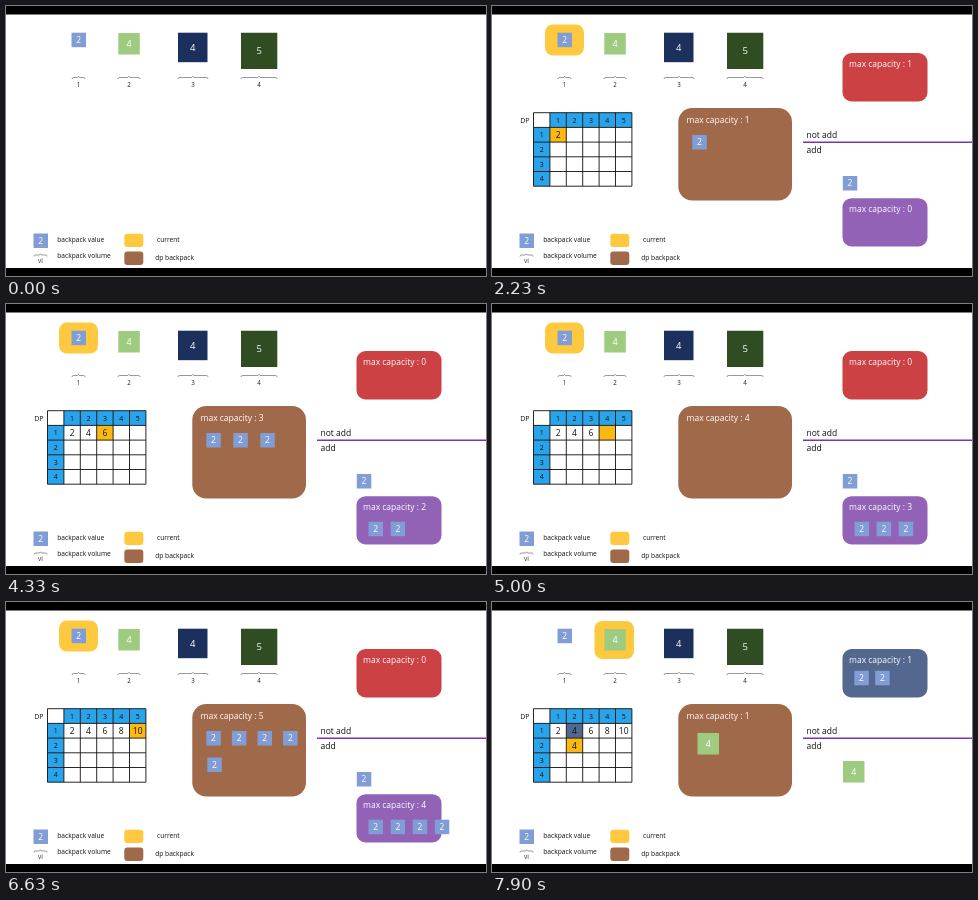
Animation of 480 by 270 pixels, one loop 8000 ms. Source, as an HTML page with a canvas:

```html
<!DOCTYPE html>
<html>
<head>
<meta charset="utf-8">
<style>
html, body { margin: 0; width: 100%; height: 100%; overflow: hidden; background: #fff; }
canvas { display: block; width: 480px; height: 270px; }
</style>
</head>
<body>
<canvas></canvas>
<script>
const LOOP = 8000;
const BLUE = '#819dd5', GREEN = '#9fcb80', NAVY = '#1c305d', FOREST = '#2f4c22';
const YELLOW = '#fec93e', BROWN = '#a0694a', RED = '#cc4143', PURPLE = '#9162b6';
const SLATE = '#53678f', HEADER = '#29a4ea', CURRENT = '#fdb913';

const canvas = document.querySelector('canvas');
const ctx = canvas.getContext('2d');
const ratio = window.devicePixelRatio || 1;
canvas.width = 480 * ratio;
canvas.height = 270 * ratio;
ctx.scale(ratio, ratio);

function text(label, x, y, size, color = '#111', align = 'left') {
  ctx.font = `${size}px "Open Sans", "Noto Sans", sans-serif`;
  ctx.fillStyle = color;
  ctx.textAlign = align;
  ctx.fillText(label, x, y);
}

function box(x, y, w, h, color, radius = 0) {
  ctx.fillStyle = color;
  ctx.beginPath();
  ctx.roundRect(x, y, w, h, radius);
  ctx.fill();
}

function item(value, x, y, size, color, fontSize = 8.5) {
  box(x, y, size, size, color);
  text(value, x + size / 2, y + size / 2 + fontSize * 0.36, fontSize, '#fff', 'center');
}

const two = (x, y) => item(2, x, y, 14.5, BLUE);
const four = (x, y) => item(4, x, y, 21.5, GREEN, 9);

function brace(x, w, y) {
  const mid = x + w / 2;
  ctx.strokeStyle = '#555';
  ctx.lineWidth = 0.6;
  ctx.beginPath();
  ctx.moveTo(x, y + 1.5);
  ctx.quadraticCurveTo(x, y, x + 1.5, y);
  ctx.lineTo(mid - 1, y);
  ctx.lineTo(mid, y - 1.2);
  ctx.lineTo(mid + 1, y);
  ctx.lineTo(x + w - 1.5, y);
  ctx.quadraticCurveTo(x + w, y, x + w, y + 1.5);
  ctx.stroke();
}

function capacity(value, x, y) {
  text(`max capacity : ${value}`, x, y, 8.5, '#fff');
}

function drawBase() {
  box(0, 0, 480, 270, '#fff');
  box(0, 0, 480, 8.5, '#000');
  box(0, 262, 480, 8, '#000');
  two(27.5, 227.5);
  brace(28, 13, 249);
  text('vi', 34.5, 257.3, 6.5, '#333', 'center');
  text('backpack value', 51.3, 235.8, 6.65);
  text('backpack volume', 51.3, 252.3, 6.65);
  box(118.3, 227.7, 19, 13.3, YELLOW, 3);
  box(118.3, 245.5, 19, 13.5, BROWN, 3);
  text('current', 151, 235.8, 6.65);
  text('dp backpack', 149.2, 254.2, 6.65);
}

function drawItems(row) {
  if (row === 1) box(53, 18.5, 39, 31, YELLOW, 8);
  if (row === 2) box(102.5, 19, 39.5, 38, YELLOW, 8);
  two(65.5, 26.7);
  four(112.3, 27);
  item(4, 172, 26.7, 29.5, NAVY, 9.5);
  item(5, 235, 26.7, 36.3, FOREST, 9.5);
  [[66, 13], [112, 22], [172, 30], [235, 36]].forEach(([x, w], i) => {
    brace(x, w, 71.5);
    text(i + 1, x + w / 2, 80.7, 6.2, '#222', 'center');
  });
}

function drawTable(row, col, filled, solved) {
  const left = 41.5, top = 106.7, cw = 16.4, ch = 14.7;
  const cell = (r, c, color) => box(left + c * cw, top + r * ch, cw, ch, color);
  const write = (label, r, c, size) =>
    text(label, left + (c + 0.5) * cw, top + (r + 0.5) * ch + size * 0.37, size, '#111', 'center');

  text('DP', 28.2, 117, 7);
  for (let c = 1; c <= 5; c++) cell(0, c, HEADER);
  for (let r = 1; r <= 4; r++) cell(r, 0, HEADER);
  if (row === 2) cell(1, 2, SLATE);
  if (row) cell(row, col, CURRENT);

  ctx.strokeStyle = '#111';
  ctx.lineWidth = 0.9;
  ctx.beginPath();
  for (let c = 0; c <= 6; c++) {
    ctx.moveTo(left + c * cw, top);
    ctx.lineTo(left + c * cw, top + 5 * ch);
  }
  for (let r = 0; r <= 5; r++) {
    ctx.moveTo(left, top + r * ch);
    ctx.lineTo(left + 6 * cw, top + r * ch);
  }
  ctx.stroke();

  for (let c = 1; c <= 5; c++) write(c, 0, c, 7);
  for (let r = 1; r <= 4; r++) write(r, r, 0, 7);
  for (let c = 1; c <= filled; c++) write(2 * c, 1, c, 8.5);
  if (row === 2 && solved) write(4, 2, 2, 8.5);
}

function drawBackpack(label, row, count) {
  box(186.3, 102, 113.7, 92.5, BROWN, 14);
  capacity(label, 194.5, 117);
  if (row === 2) {
    if (count) four(205.5, 131);
    return;
  }
  const pitch = count === 3 ? 27 : 25.6;
  for (let i = 0; i < count; i++) {
    if (i < 4) two(200.3 + i * pitch, 129);
    else two(201.3, 155.5);
  }
}

function drawNotAdd(row, col) {
  box(350.5, 47, 85, 48.5, row === 2 ? SLATE : RED, 9);
  capacity(row === 2 || col < 3 ? 1 : 0, 357, 60.5);
  if (row === 2) {
    two(362.3, 68.8);
    two(383.2, 68.8);
  }
}

function drawAdd(row, col) {
  if (row === 2) return four(351, 159);
  two(350.8, 170);
  box(350.5, 192.2, 85, 48.3, PURPLE, 9);
  capacity(col - 1, 357, 206);
  for (let i = 0; i < col - 1; i++) two(362.5 + i * 22.1, 217.7);
}

// Each step fills one table cell: row, column, start time.
const STEPS = [
  [1, 1, 1450], [1, 2, 2350], [1, 3, 3350],
  [1, 4, 4550], [1, 5, 5800], [2, 2, 6850]
];

function draw(t) {
  const [row, col, start] = STEPS.findLast(step => t >= step[2]) || [0, 0, 0];
  const age = t - start;
  const solved = row > 0 && age >= 500;
  const filled = row === 2 ? 5 : solved ? col : Math.max(0, col - 1);

  drawBase();
  drawItems(row);
  if (t >= 300) drawTable(row, col, filled, solved);
  if (t >= 600) drawBackpack(row === 2 ? 1 : col || '', row, solved ? col : 0);
  if (t >= 850) {
    box(311, 135.5, 169, 1.5, '#7b35aa');
    text('not add', 314.5, 132, 8.5);
    text('add', 314.5, 147, 8.5);
  }
  if (row && age >= 150) drawNotAdd(row, col);
  if (row && age >= 300) drawAdd(row, col);
}

function tick() {
  draw(performance.now() % LOOP);
  requestAnimationFrame(tick);
}
tick();
</script>
</body>
</html>
```
